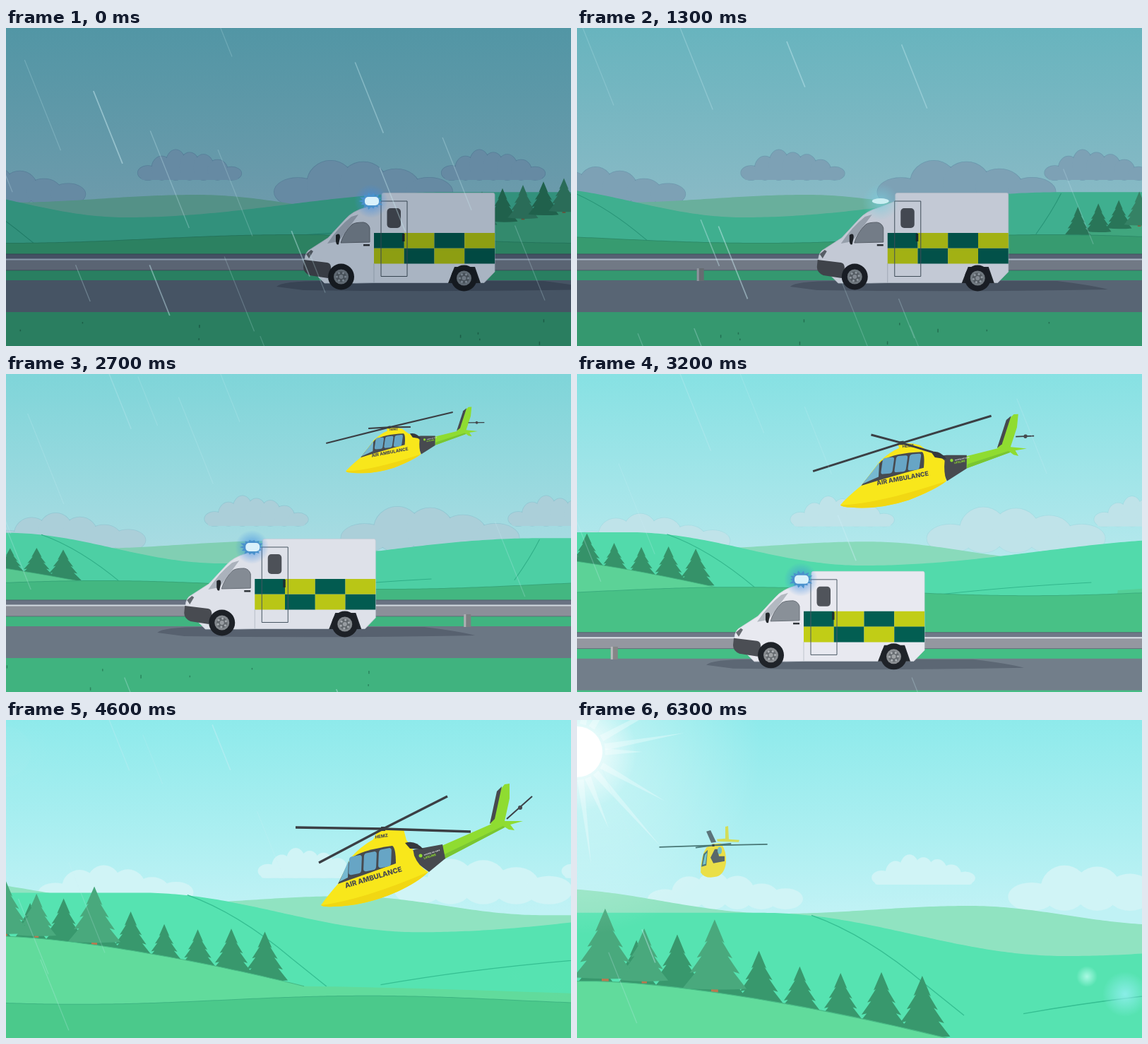
Animation of 800 by 450 pixels, one loop 6.4 s. Source, as an HTML page with a canvas:

```html
<!DOCTYPE html>
<html lang="en">
<head>
<meta charset="utf-8">
<title>Ambulance and helicopter</title>
<style>
html, body { margin: 0; width: 100%; height: 100%; overflow: hidden; }
canvas { display: block; width: 800px; height: 450px; }
</style>
</head>
<body>
<canvas id="stage" width="800" height="450"></canvas>
<script>
const g = document.getElementById('stage').getContext('2d');
const LOOP = 6400, STEP = 100, TAU = Math.PI * 2;
let t = 0;

const clamp = u => Math.max(0, Math.min(1, u));
const smooth = u => u * u * (3 - 2 * u);
const ramp = (from, to) => smooth(clamp((t - from) / (to - from)));
const easeOut = (u, n) => 1 - (1 - u) ** n;
const mix = (a, b, u) => a + (b - a) * u;
const wave = (d, half, high) => high * (1 - Math.cos(Math.PI * Math.min(d / half, 1))) / 2;

function random(seed) {
  return () => (seed = (seed * 16807) % 2147483647) / 2147483647;
}

// The camera stays level, then rises; near layers sink further than distant ones
const climb = () => clamp((t - 2700) / 3600);
const sink = depth => depth * (.8 * smooth(climb()) + .2 * climb() ** 2);

// Storm light: colours brighten as the weather clears
function tone(hex, w = 1) {
  const dark = clamp(1 - t / 3600) * w, n = parseInt(hex.slice(1), 16);
  const c = [n >> 16, n >> 8 & 255, n & 255].map((p, i) => Math.round(p * (1 - dark * (.42 - .06 * i))));
  return `rgb(${c})`;
}

function shape(d, fill) { g.fillStyle = fill; g.fill(new Path2D(d)); }

function line(d, color, width = 1) {
  g.strokeStyle = color;
  g.lineWidth = width;
  g.stroke(new Path2D(d));
}

function rect(x, y, w, h, fill, r = 0) {
  g.fillStyle = fill;
  g.beginPath();
  g.roundRect(x, y, w, h, r);
  g.fill();
}

function oval(x, y, rx, ry, fill) {
  g.fillStyle = fill;
  g.beginPath();
  g.ellipse(x, y, rx, ry, 0, 0, TAU);
  g.fill();
}

function glow(x, y, r, color, strength) {
  const f = g.createRadialGradient(x, y, 0, x, y, r);
  [strength, strength * .5, 0].forEach((a, i) => f.addColorStop(i / 2, `rgba(${color},${a})`));
  oval(x, y, r, r, f);
}

function ridge(f, fill) {
  g.fillStyle = fill;
  g.beginPath();
  g.moveTo(0, 450);
  for (let x = 0; x <= 800; x += 5) g.lineTo(x, f(x));
  g.lineTo(800, 450);
  g.fill();
}

function sky() {
  const f = g.createLinearGradient(0, 0, 0, 270);
  f.addColorStop(0, tone('#8eeaeb'));
  f.addColorStop(1, tone('#c0f2f5'));
  rect(0, 0, 800, 450, f);
}

function cloud(x, base, w, h, n, flat) {
  const light = clamp(t / 3600) ** 1.5;
  const fill = `rgb(${mix(102, 208, light)},${mix(138, 244, light)},${mix(163, 246, light)})`;
  const r = random(n * 31), puffs = [];
  for (let i = 0; i < n; i++) {
    const u = (i + .5) / n, high = h * (.4 + .6 * Math.sin(Math.PI * u ** .85)) * (.8 + .25 * r());
    puffs.push([x + w * u, base - high / 2, w / n * .72, high / 2]);
  }
  g.strokeStyle = `rgba(60,85,125,${.4 * (1 - light)})`;
  g.lineWidth = 1.5;
  for (const p of puffs) {
    g.beginPath();
    g.ellipse(...p, 0, 0, TAU);
    g.stroke();
  }
  for (const p of puffs) oval(...p, fill);
  if (flat) rect(x, base - 9, w, 9, fill, 4);
}

function clouds() {
  const dx = .035 * t + 10 * easeOut(climb(), 3), dy = sink(18);
  cloud(-100 + dx * .9, 250 + dy, 205, 57, 6);
  cloud(390 + dx, 252 + dy, 232, 76, 5);
  cloud(191 + dx, 215 + dy, 138, 42, 7, true);
  cloud(621 + dx, 215 + dy, 138, 42, 7, true);
}

function hills() {
  const cx = 270 + .042 * t + 20 * easeOut(climb(), 3), cy = 236 + sink(27);
  ridge(x => {
    const d = x - cx;
    if (d > 0) return cy + wave(d, 280, 27);
    return cy + wave(-d, 270, 11) - (d < -270 ? wave(-d - 270, 330, 36) : 0);
  }, tone('#90e3c1'));

  const vx = 170 + .05 * t + 207 * easeOut(climb(), 3), vy = 268 + sink(66), s = .85 + .35 * easeOut(climb(), 1.6);
  ridge(x => {
    const d = (x - vx) / s;
    return vy - s * (d < 0 ? wave(-d, 360, 51) : wave(d, 530, 42));
  }, tone('#56e3b1'));
  g.save();
  g.translate(vx, vy);
  g.scale(s, s);
  const ink = tone('#35bf92');
  line('M-300-48Q-235-25-165 34L-120 70', ink, 1.2);
  line('M-50 68Q120 38 350 26', ink, 1.2);
  line('M530-40Q515-10 488 28', ink, 1.2);
  g.restore();
}

function tree(x, base, h, front) {
  const w = h * .46, top = base - h, right = [], left = [];
  for (let k = 1; k <= 4; k++) {
    const out = w * (k / 4) ** .85, y = top + h * (.12 + k * .22);
    right.push(`${x + out} ${y}`, `${x + out * .74} ${y - h * .03}`);
    left.unshift(`${x - out * .74} ${y - h * .03}`, `${x - out} ${y - h * .01}`);
  }
  if (front) rect(x - h * .05, base - h * .15, h * .1, h * .2, tone('#b8794f'));
  shape(`M${x} ${top}L${right.slice(0, 7).join('L')}Q${x} ${base + 2} ${left.slice(1).join('L')}Z`,
    tone(front ? '#49a97d' : '#38986d'));
}

function farField() {
  g.save();
  g.translate(.094 * t - 75, 0);
  shape('M520 460L540 306Q650 300 720 277Q790 258 875 258L1100 264V460Z', tone('#58d89c'));
  for (let i = 0; i < 8; i++) tree(662 + 29 * i, 293 - 4.8 * i, i < 3 ? 40 : 47, i > 2 && i % 2);
  g.restore();
}

function woodField() {
  const c = climb(), edge = x => 304 + 72 * Math.max(0, x / 430) ** 1.5;
  g.save();
  g.translate(85 - .15 * Math.max(0, 2700 - t) + 410 * easeOut(c, 1.6), 291 + sink(155));
  g.scale(.8 + sink(.43), .62 + .61 * c ** .8);
  g.translate(-380, -366);
  for (let i = 8; i >= 0; i--) {
    const x = 375 - 47 * i;
    tree(x, edge(x) + 5, 60 + 10 * Math.cos(1.2 * i));
  }
  for (let i = 0; i < 3; i++) {
    const x = 10 + 45 * i + 18 * i * (i - 1);
    tree(x, edge(x) - 4, 80 - 20 * (i % 2), true);
  }
  let d = 'M-300 304';
  for (let x = 0; x <= 430; x += 10) d += `L${x} ${edge(x)}`;
  if (t > 1900) {
    shape(d + 'Q600 378 900 390V700H-300Z', tone('#61db9c'));
    line(d, tone('#48b985'));
  }
  g.restore();
}

function frontField() {
  const y = 299 + sink(200);
  ridge(x => y - 1 + 6 * Math.cos((x - .2 * t) / 130), tone('#3eb582'));
  ridge(x => y + 6 * Math.cos((x - .2 * t) / 130), tone('#4bc98b'));
}

function road() {
  rect(0, 319.5, 800, 24, tone('#5c6875'));
  rect(0, 320.5, 800, 7, tone('#757d8d'));
  rect(0, 328, 800, 14.5, tone('#9b9da5'));
  rect(0, 326.5, 800, 2, tone('#e9edf2'));
  rect(0, 343.5, 800, 14, tone('#47c68a'));
  rect(0, 357, 800, 45, tone('#78838f'));
  rect(0, 402, 800, 250, tone('#48c589'));
  const post = (1016 + t * 1.199) % 1200;
  rect(post - 5, 340, 10, 18, tone('#8b8c8c'));
  rect(post - 5, 340, 3, 18, tone('#c1c2c3'));
  const r = random(41);
  for (let i = 0; i < 12; i++) {
    rect((r() * 1000 + t * 1.2) % 1000 - 50, 410 + r() * 40, 1.5, 2 + r() * 3, tone('#309266'));
  }
}

function wheel(x, y) {
  [['#20242a', 18.5], ['#8f9396', 10.5], ['#6b7074', 7.5]].forEach(([c, r]) => oval(x, y, r, r, tone(c, .8)));
  for (let i = 0; i < 6; i++) {
    const a = i * TAU / 6 + t / 90;
    oval(x + 6 * Math.cos(a), y + 6 * Math.sin(a), 1.6, 1.6, tone('#b5b8bb', .8));
  }
  oval(x, y, 3, 3, tone('#a5a8ab', .8));
}

function beacon() {
  if ((t / STEP) % 5 === 3) {
    glow(390, 246, 26, '120,205,220', .7);
    oval(390, 245, 12, 4, '#c9eef2');
    return;
  }
  const r = random(7 + t), star = [];
  glow(396, 245, 24, '60,140,225', .8);
  for (let i = 0; i < 28; i++) {
    const a = i * TAU / 28, k = i % 2 ? .7 : .85 + r() * .25;
    star.push(`${396 + Math.cos(a) * 17 * k} ${245 + Math.sin(a) * 12 * k}`);
  }
  shape(`M${star.join('L')}Z`, '#4a91cc');
  rect(387, 239, 20, 12, '#d9f1fb', 5);
}

function van() {
  const c = h => tone(h, .7);
  g.save();
  g.translate(121 - .0625 * t, 0);
  shape('M262 366Q270 357 340 358H640Q690 364 712 370Q500 374 300 371Z', tone('#616b78'));
  const body = 'M411 236Q411 233.500 414 233.500H569Q571 233.500 571 236V345L556 360.500H400L375 361H330L302 333Q301 321 307 315L335 297L360 270Q370 259 388 254L411 245Z';
  const glass = 'M353 304Q357 290 369 278Q373 275 385 275Q392 276 394 283V303Z';
  shape(body, c('#f0f0f6'));
  line(body, c('#d8dce4'), .8);
  shape('M505 361L514 338H543L551 361Z', c('#24292f'));
  shape('M301 328L334 332Q340 333 339 342L335 354L309 350Q300 346 300 338Z', c('#4e5056'));
  shape('M334 305Q350 281 368 267L378 264L350 302Z', c('#b9bec6'));
  shape(glass, c('#8e949c'));
  line(glass, c('#6d737b'));
  shape('M346 293Q352 289 352 296L350 306Q347 308 346 302Z', c('#25292e'));
  shape('M304 320L311 314L314 316L308 326Z', c('#6b7076'));
  rect(385, 306, 9, 2.5, c('#33373c'));
  for (let i = 0; i < 8; i++) {
    const col = i % 4, row = i >> 2;
    rect(400 + col * 42.75, 290 + row * 21.75, 42.8, 21.8, c((col + row) % 2 ? '#c8d317' : '#026154'));
  }
  line('M410 245H447V351.500H410Z', c('#4d5b66'));
  line('M400 333V360', c('#c5cad2'));
  rect(418.5, 255, 19.5, 28, c('#53565d'), 5);
  rect(440, 291, 3.5, 11, c('#1f3236'));
  wheel(353.5, 352);
  wheel(527.5, 354);
  beacon();
  g.restore();
}

function label(text, x, y, size, angle, fill) {
  g.save();
  g.translate(x, y);
  g.rotate(angle);
  g.font = `800 ${size}px Inter, sans-serif`;
  g.fillStyle = fill;
  g.fillText(text, 0, 0);
  g.restore();
}

// Seen from the side; yaw slides the cabin details along the hull
function sideView(yaw) {
  const dark = '#474a4f', green = '#8fdc31';
  const sx = 20 * yaw, sy = -13 * yaw;
  const p = (x, y, k) => `${x + k * sx} ${y + k * sy} `;
  const belly = `Q${p(50, 74, .5)}20 88Q-25 108-70 109Q-85 110-88 107Z`;

  shape(`M${p(83, 23, 1)}L156-9Q172-14 172-3L${p(86, 42, 1)}Z`, green);
  shape(`M${p(86, 42, 1)}L172-3L176-8L${p(87, 35, 1)}Z`, '#79c632');
  shape('M151-8L163-53L172-64L179-65L179-44L172-12L198-12L180-7L186 1L178 0L170-5Z', green);
  shape('M151-8L161-54L168-61L158-15Z', dark);
  shape(`M${p(28, 33, 1.4)}L${p(46, 28, 1.3)}L${p(84, 21, 1)}L${p(88, 41, .9)}L${p(65, 60, .6)}Z`, dark);
  shape(`M-88 107Q-79 94 ${p(-64, 77, .3)}L${p(-46, 40, .7)}Q${p(-32, 24, .7)}${p(-14, 14, .5)}L-7 1Q10-4 29 0` +
    `L${p(33, 15, .5)}Q${p(43, 25, .9)}${p(44, 37, 1.3)}Q${p(50, 52, 1)}${p(64, 60, .6)}` + belly, '#f8e71b');
  shape(`M-88 107Q-30 100 ${p(64, 60, .6)}` + belly, '#f1d713');
  shape(`M${p(31, 19, .8)}Q${p(45, 14, .8)}${p(57, 28, .8)}L${p(38, 27, .8)}Z`, '#35383d');
  shape(`M${p(-64, 77, .3)}L${p(-46, 41, .8)}Q${p(-31, 29, 1)}${p(13, 23, 1)}Q${p(18, 26, 1)}${p(18, 48, 1)}Q${p(-10, 58, 1)}${p(-64, 77, .3)}Z`, dark);
  shape(`M${p(-62, 74, .3)}L${p(-49, 44, .8)}L${p(-50, 68, .9)}Z`, '#76b9d1');
  g.save();
  g.translate(sx, sy);
  for (let i = 0; i < 3; i++) {
    g.save();
    g.transform(1, -.2, -.04, 1, -48 + 21 * i, 39 - 5 * i);
    rect(0, 0, 18, 26, '#67a5c5', 4);
    g.restore();
  }
  label('AIR AMBULANCE', -53, 83, 9.9, -.29, dark);
  label('HEMZ', -11 - sx * .4, 13 - sy * .5, 6.2, -.16, dark);
  g.translate(sx * .4, sy * .4);
  oval(53, 37, 2.5, 2.5, green);
  label('county air care', 58, 37, 3.2, -.3, '#e5e8ea');
  label('LIFELINE', 58, 42, 4.2, -.3, green);
  g.restore();
  const k = Math.cos((t - 4600) / 140 + .7) > 0 ? 1 : .8;
  line(`M${193 - 18 * k} ${-15 - 14 * yaw}L${193 + 18 * k} ${-47 + 14 * yaw}`, '#3b4046', 2);
  oval(194, -31, 3, 3, dark);
}

function rearView() {
  shape('M-10-20L-4-22L4-5L-3-4Z', '#5c747a');
  shape('M17-27L21-28L22-9L37-8L36-5L6-6L5-9L17-10Z', '#d3dd59');
  shape('M-18 38Q-18 15-10 3Q0-5 11-3Q19 8 18 24Q16 40 5 44Q-12 48-18 38Z', '#eadf48');
  shape('M-17 30L-14 12L-8 6L-10 28Z', '#50797b');
  shape('M-15 27L-12 13L-9 10L-11 26Z', '#76c6ce');
  shape('M-4 17L2 5L6 5L8 15L16 15L16 22L0 25Z', '#59676a');
  oval(9, 7, 3, 5, '#75bfc3');
}

function rotor(s, yaw) {
  const near = ramp(2700, 3600), far = ramp(4600, 6300);
  const flat = (.2 + .8 * near) * (1 - .94 * far);
  g.rotate(-.1 * yaw - .1 * (1 - near) - .04 * far);
  g.strokeStyle = far > .5 ? '#487675' : '#3b3f44';
  g.lineWidth = Math.max(1.6 / s, 3.3);
  for (let i = 0; i < 4; i++) {
    const a = (t - 4600) / STEP * TAU / 10 + i * TAU / 4, c = Math.cos(a), q = Math.sin(a);
    g.beginPath();
    g.moveTo(0, -1);
    g.lineTo(-124 * c + 91 * q, -3 * c - 47 * q * flat);
    g.stroke();
  }
  rect(-3, -4, 6, 6, '#3b3f44');
}

// Flight: time, rotor hub x and y, scale
const FLIGHT = [[1900, 862, 70, .62], [2700, 543, 76, .63], [3600, 440, 104, .955], [4600, 534, 155, 1], [6400, 190, 178, .52]];

function flight() {
  const i = Math.max(0, FLIGHT.findLastIndex(k => k[0] <= t)), a = FLIGHT[i], b = FLIGHT[i + 1];
  let u = (t - a[0]) / (b[0] - a[0]);
  u = i === 0 ? u : i === 1 ? easeOut(u, 2) : smooth(u);
  return a.map((v, j) => mix(v, b[j], u)).slice(1);
}

function helicopter() {
  const [x, y, s] = flight(), yaw = 1 - ramp(3600, 4600);
  g.save();
  g.translate(x, y);
  g.scale(s, s);
  g.save();
  if (t < 5800) {
    g.rotate(.1 * yaw);
    g.scale(1 - .8 * ramp(4600, 6300), 1);
    sideView(yaw);
  } else {
    g.scale(1.9, 1.9);
    rearView();
  }
  g.restore();
  rotor(s, yaw);
  g.restore();
}

function rain() {
  const r = random(2024), n = Math.round(30 * (1 - t / 7200));
  for (let i = 0; i < n; i++) {
    const x0 = r() * 1000 - 200, y0 = r() * 620, len = 45 + r() * 95, v = .7 + r() * .7, a = .15 + r() * .32;
    const y = (y0 + t * v) % 620 - 140, x = x0 + y * .4;
    line(`M${x} ${y}l${len * .4} ${len}`, `rgba(205,238,245,${a})`, .8 + a * 2);
  }
}

function sun() {
  const r = random(99);
  g.save();
  g.globalAlpha = clamp((t - 4500) / 1700) ** 1.5;
  glow(0, 45, 260, '255,255,255', .5);
  glow(0, 45, 85, '255,255,255', 1);
  oval(0, 45, 36, 36, '#fff');
  for (let i = 0; i < 18; i++) {
    const a = i * TAU / 18 + r() * .2, len = 90 + r() * 130, w = .12;
    const at = (d, k) => `${k * Math.cos(a + d)} ${45 + k * Math.sin(a + d)}`;
    shape(`M${at(-w, 40)}L${at(0, len)}L${at(w, 40)}Z`, 'rgba(255,255,255,.3)');
  }
  glow(722, 363, 15, '190,255,240', .8);
  glow(776, 388, 32, '150,240,245', .8);
  g.restore();
}

function draw(now) {
  t = Math.floor(now / STEP) * STEP % LOOP;
  sky();
  clouds();
  hills();
  farField();
  woodField();
  frontField();
  const drop = sink(1000);
  if (drop < 220) {
    g.save();
    g.translate(0, drop);
    road();
    van();
    g.restore();
  }
  sun();
  helicopter();
  rain();
}

const start = performance.now();
function tick() {
  draw(performance.now() - start);
  requestAnimationFrame(tick);
}
tick();
</script>
</body>
</html>
```
